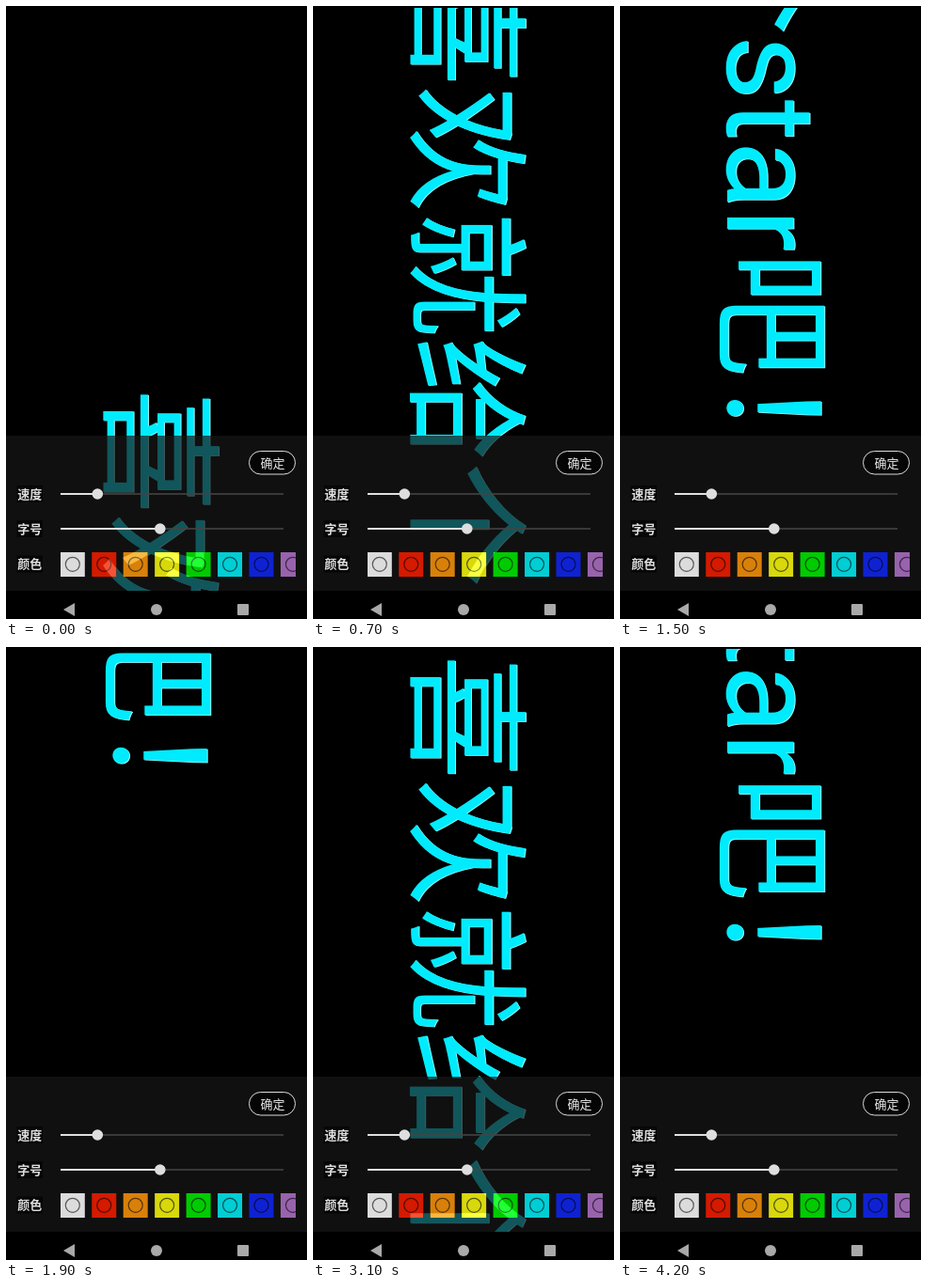
Write an HTML page that moves like this. It is 320 px wide and 652 px high and loops after 4.3 s.

```html
<!DOCTYPE html>
<html lang="zh-CN">
<head>
<meta charset="utf-8">
<style>
html, body { margin: 0; width: 100%; height: 100%; overflow: hidden; background: #000; }
svg { display: block; width: 320px; height: 652px; }
.banner { font: 400 133.25px Roboto, "Noto Sans CJK SC", sans-serif; text-rendering: geometricPrecision; white-space: pre; }
.label { font: 500 13px "Noto Sans CJK SC", sans-serif; fill: #e8e8e8; }
.bold { font-weight: 700; fill: #dedede; }
.glow { mix-blend-mode: plus-lighter; }
</style>
</head>
<body>
<svg viewBox="0 0 320 652" lang="zh-CN">
  <defs>
    <clipPath id="view"><rect y="2" width="320" height="620"/></clipPath>
    <clipPath id="chips"></clipPath>
    <clipPath id="strip"><rect x="58" y="575" width="250" height="40"/></clipPath>
    <text id="words" class="banner">喜欢就给个star吧！</text>
  </defs>
  <rect width="320" height="652"/>
  <g clip-path="url(#view)">
    <g class="scroll">
      <use href="#words" x=".2" y="-.2" fill="#a8f6fc"/>
      <use href="#words" x="-.5" y=".5" fill="#00ebfd"/>
    </g>
  </g>
  <rect y="457" width="320" height="165" fill="#181818" fill-opacity=".7"/>
  <g id="panel"></g>
  <g clip-path="url(#strip)">
    <g id="swatches"></g>
    <g class="glow" clip-path="url(#chips)">
      <g class="scroll"><use href="#words" x="-.3" y=".3" fill="#223834"/></g>
    </g>
  </g>
  <rect x="258.5" y="473.5" width="49" height="24.5" rx="12.2" fill="#050505" stroke="#dcdcdc"/>
  <text class="label" x="270.5" y="490.5">确定</text>
  <rect y="622" width="320" height="30"/>
  <g fill="#a9a9a9">
    <path d="M61 642L73 635V649Z"/>
    <circle cx="160" cy="642" r="6"/>
    <rect x="246" y="636" width="12" height="12" rx="1"/>
  </g>
</svg>
<script>
const LOOP = 4300, STEP = 100, BASELINE = 114.5;

// [time, top of the banner]; the jump from 2200 to 2300 is the restart
const KEYS = [
  [0, 407.4], [600, 47.4], [700, -47.6], [1200, -400.6], [1900, -947],
  [2200, -1161], [2300, 606], [2700, 320.4], [3000, 80.4], [3500, -279.6], [4200, -759]
];
const COLORS = ["#dcdcdc", "#d41a00", "#d8800a", "#d8d80c", "#00cb00", "#00ced4", "#0f22d2", "#9863ac"];

const byId = id => document.getElementById(id);

function add(parent, tag, attrs, text) {
  const el = document.createElementNS("http://www.w3.org/2000/svg", tag);
  for (const k in attrs) el.setAttribute(k, attrs[k]);
  if (text) el.textContent = text;
  parent.appendChild(el);
}

function label(text, y) {
  const panel = byId("panel");
  add(panel, "rect", { x: 11.5, y: y - 9, width: 27.5, height: 18, fill: "#060606" });
  add(panel, "text", { class: "label bold", x: 12.3, y: y + 4.8 }, text);
}

function slider(text, y, knob) {
  const panel = byId("panel");
  label(text, y);
  add(panel, "rect", { x: 58, y: y - 0.8, width: 237, height: 1.6, fill: "#444" });
  add(panel, "rect", { x: 58, y: y - 1, width: knob - 58, height: 2, fill: "#e0e0e0" });
  add(panel, "circle", { cx: knob, cy: y, r: 5.8, fill: "#dedede" });
}

slider("速度", 519, 97.3);
slider("字号", 556, 163.8);
label("颜色", 593.5);

COLORS.forEach((fill, i) => {
  const x = 57.8 + i * 33.45, box = { x, y: 581, width: 26, height: 26 };
  add(byId("swatches"), "rect", { ...box, fill });
  add(byId("swatches"), "circle", {
    cx: x + 13, cy: 593.8, r: 7.5, fill: "none", stroke: "#000", "stroke-opacity": 0.6, "stroke-width": 1.2
  });
  add(byId("chips"), "rect", box);
});

function topAt(t) {
  let i = KEYS.length - 1;
  while (KEYS[i][0] > t) i--;
  const [t0, y0] = KEYS[i];
  if (t === t0) return y0;
  const [t1, y1] = KEYS[i + 1];
  return y0 + (y1 - y0) * (t - t0) / (t1 - t0);
}

const movers = document.querySelectorAll(".scroll");

function draw(ms) {
  const t = Math.floor((ms % LOOP) / STEP) * STEP;
  const move = `translate(${BASELINE} ${topAt(t)}) rotate(90)`;
  movers.forEach(el => el.setAttribute("transform", move));
}

const start = performance.now();
function tick() {
  draw(performance.now() - start);
  requestAnimationFrame(tick);
}
tick();
</script>
</body>
</html>
```
